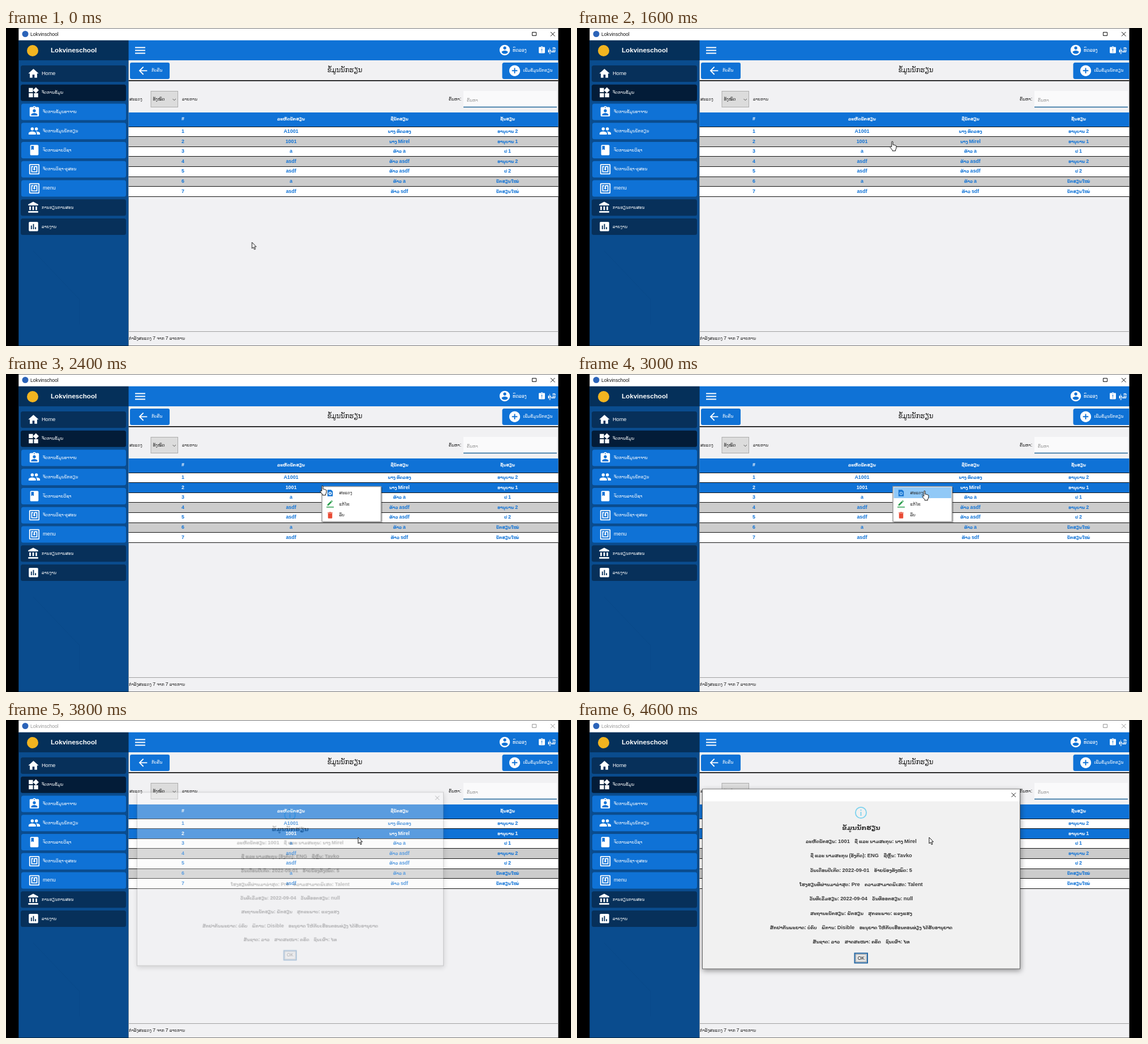
These frames come from a looping animation (998x561 px, 4800 ms). An HTML page:

```html
<!DOCTYPE html>
<html lang="lo">
<head>
<meta charset="utf-8">
<title>School records</title>
<style>
html, body { margin: 0; width: 100%; height: 100%; overflow: hidden; background: #000; }
svg { display: block; width: 998px; height: 561px; }
text { font-family: 'Liberation Sans', 'DejaVu Sans', sans-serif; }

.pick, .pick-text, .chrome, .chrome-line, .menu, .hover, .dialog, .cursor, .arrow, .hand {
  animation-duration: 4.8s;
  animation-timing-function: step-end;
  animation-iteration-count: infinite;
}
.pick { animation-name: pick; }
.pick-text { animation-name: pick-text; }
.chrome { animation-name: chrome; }
.chrome-line { animation-name: chrome-line; }
.menu { animation-name: menu; }
.hover { animation-name: hover; }
.dialog { animation-name: dialog; transform-origin: 502px 280.5px; }
.cursor { animation-name: cursor; }
.arrow { animation-name: arrow; }
.hand { animation-name: hand; }

@keyframes pick { 0% { fill: #cccccc; } 37.49%, 100% { fill: #0f72d6; } }
@keyframes pick-text { 0% { fill: #0f72d6; } 37.49%, 100% { fill: #fff; } }
@keyframes chrome { 0% { fill: #111; } 79.16%, 100% { fill: #999; } }
@keyframes chrome-line { 0% { stroke: #111; } 79.16%, 100% { stroke: #999; } }
@keyframes menu { 0% { opacity: 0; } 49.99% { opacity: 1; } 79.16%, 100% { opacity: 0; } }
@keyframes hover { 0% { opacity: 0; } 54.16%, 100% { opacity: 1; } }
@keyframes dialog {
  0% { opacity: 0; transform: scale(.965); }
  79.16% { opacity: .33; transform: scale(.965); }
  83.32%, 100% { opacity: 1; transform: none; }
}
@keyframes cursor {
  0% { transform: translate(434.5px, 378px); }
  4.16% { transform: translate(505px, 325px); }
  8.33% { transform: translate(537px, 270px); }
  12.49% { transform: translate(540px, 240px); }
  16.66% { transform: translate(540px, 216px); }
  20.83% { transform: translate(541px, 210px); }
  24.99% { transform: translate(547px, 193px); }
  29.16% { transform: translate(552px, 198px); }
  33.33% { transform: translate(557px, 200px); }
  37.49% { transform: translate(560px, 201px); }
  49.99% { transform: translate(559px, 197px); }
  54.16% { transform: translate(600px, 203px); }
  62.49% { transform: translate(614px, 206px); }
  66.66%, 100% { transform: translate(622px, 207px); }
}
@keyframes arrow { 0% { opacity: 1; } 8.33% { opacity: 0; } 79.16%, 100% { opacity: 1; } }
@keyframes hand { 0% { opacity: 0; } 8.33% { opacity: 1; } 79.16%, 100% { opacity: 0; } }
</style>
</head>
<body>
<svg id="stage" viewBox="0 0 998 561" xmlns="http://www.w3.org/2000/svg"></svg>
<script>
const BLUE = '#0f72d6', NAVY = '#07305a';
const LEFT = 22.3, SPLIT = 216.5, RIGHT = 975.5;
const WIDE = RIGHT - SPLIT;

// icons on a 24-unit grid
const disc = 'M12 2C6.48 2 2 6.48 2 12s4.48 10 10 10 10-4.48 10-10S17.52 2 12 2z';
const board = 'M19 3h-4.18C14.4 1.84 13.3 1 12 1c-1.3 0-2.4.84-2.82 2H5c-1.1 0-2 .9-2 2v14c0 1.1.9 2 2 2h14c1.1 0 2-.9 2-2V5c0-1.1-.9-2-2-2zm-7 0c.55 0 1 .45 1 1s-.45 1-1 1-1-.45-1-1 .45-1 1-1z';
const icons = {
  home: 'M10 20v-6h4v6h5v-8h3L12 3 2 12h3v8z',
  widgets: 'M13 13v8h8v-8zM3 21h8v-8H3zM3 3v8h8V3zm13.66-1.31L11 7.34 16.66 13l5.66-5.66z',
  teacher: board + 'm0 4c1.66 0 3 1.34 3 3s-1.34 3-3 3-3-1.34-3-3 1.34-3 3-3zm6 12H6v-1.4c0-2 4-3.1 6-3.1s6 1.1 6 3.1V19z',
  notice: board + 'M13 14h-2V8h2zm0 4h-2v-2h2z',
  people: 'M16 11a3 3 0 1 0 0-6 3 3 0 0 0 0 6zM8 11a3 3 0 1 0 0-6 3 3 0 0 0 0 6zm0 2c-2.33 0-7 1.17-7 3.5V19h14v-2.5c0-2.33-4.67-3.5-7-3.5zm8 0c-.29 0-.62.02-.97.05 1.16.84 1.97 1.97 1.97 3.45V19h6v-2.5c0-2.33-4.67-3.5-7-3.5z',
  book: 'M18 2H6c-1.1 0-2 .9-2 2v16c0 1.1.9 2 2 2h12c1.1 0 2-.9 2-2V4c0-1.1-.9-2-2-2zM6 4h5v8l-2.5-1.5L6 12z',
  tag: 'M20 2H4c-1.1 0-2 .9-2 2v16c0 1.1.9 2 2 2h16c1.1 0 2-.9 2-2V4c0-1.1-.9-2-2-2zm0 18H4V4h16zM18 6h-5c-1.1 0-2 .9-2 2v2.28c-.6.35-1 .98-1 1.72 0 1.1.9 2 2 2s2-.9 2-2c0-.74-.4-1.38-1-1.72V8h3v8H8V8h2V6H6v12h12z',
  bank: 'M4 10v7h3v-7zm6 0v7h3v-7zM2 22h19v-3H2zm14-12v7h3v-7zm-4.5-9L2 6v2h19V6z',
  chart: 'M19 3H5c-1.1 0-2 .9-2 2v14c0 1.1.9 2 2 2h14c1.1 0 2-.9 2-2V5c0-1.1-.9-2-2-2zM9 17H7v-7h2zm4 0h-2V7h2zm4 0h-2v-4h2z',
  user: disc + 'm0 3c1.66 0 3 1.34 3 3s-1.34 3-3 3-3-1.34-3-3 1.34-3 3-3zm0 14.2c-2.5 0-4.71-1.28-6-3.22.03-1.99 4-3.08 6-3.08 1.99 0 5.97 1.09 6 3.08-1.29 1.94-3.5 3.22-6 3.22z',
  add: disc + 'm5 11h-4v4h-2v-4H7v-2h4V7h2v4h4z',
  back: 'M20 11H7.83l5.59-5.59L12 4l-8 8 8 8 1.41-1.41L7.83 13H20z',
  find: 'M4 2h11l5 5v15H4zM12 8a5 5 0 1 0 0 10 5 5 0 0 0 0-10zm0 2.5a2.5 2.5 0 1 1 0 5 2.5 2.5 0 0 1 0-5z',
  edit: 'M3 13.25V17h3.75L17.81 5.94l-3.75-3.75zM20.7 3.04L17 -.7l-1.9 1.9 3.75 3.75zM0 20h24v3H0z',
  bin: 'M6 19c0 1.1.9 2 2 2h8c1.1 0 2-.9 2-2V7H6zM19 4h-3.5l-1-1h-5l-1 1H5v2h14z'
};

const rect = (x, y, w, h, fill, more = '') =>
  `<rect x="${x}" y="${y}" width="${w}" height="${h}" fill="${fill}" ${more}/>`;
const line = (d, color, width = 1, more = '') =>
  `<path d="${d}" fill="none" stroke="${color}" stroke-width="${width}" ${more}/>`;
const rule = (y, color, width) => line(`M${SPLIT} ${y}H${RIGHT}`, color, width);
const circle = (x, y, r, fill, more = '') =>
  `<circle cx="${x}" cy="${y}" r="${r}" fill="${fill}" ${more}/>`;
const icon = (name, x, y, size, fill = '#fff') =>
  `<path transform="translate(${x - size / 2} ${y - size / 2}) scale(${size / 24})" d="${icons[name]}" fill="${fill}" fill-rule="evenodd"/>`;
// Latin runs are set larger than the Lao around them; double spaces mark wide gaps
const text = (x, y, str, size, fill, more = '') =>
  `<text x="${x}" y="${y}" font-size="${size}" fill="${fill}" ${more}>` +
  str.replace(/[!-~]+/g, '<tspan font-size="1.25em">$&</tspan>').replace(/ {2}/g, '\u00a0\u00a0\u00a0 ') + '</text>';
const BOLD = 'font-weight="700"';
const MID = 'text-anchor="middle"';

function titleBar() {
  return rect(LEFT, 0, RIGHT - LEFT, 1, '#777') + rect(LEFT, 1, RIGHT - LEFT, 21, '#fff') +
    circle(34, 10.5, 5.5, '#2b63b8') +
    text(43, 14, 'Lokvinschool', 6.9, '#111', 'class="chrome"') +
    line('M929.5 7.5h7v6h-7zM962 7l7.5 7.5M969.5 7l-7.5 7.5', '#111', 1, 'class="chrome-line"');
}

function sidebar() {
  const items = [
    ['home', 'Home'], ['widgets', 'ຈັດການຂໍ້ມູນ'],
    ['teacher', 'ຈັດການຂໍ້ມູນອາຈານ'], ['people', 'ຈັດການຂໍ້ມູນນັກຮຽນ'],
    ['book', 'ຈັດການລາຍວິຊາ'], ['tag', 'ຈັດການວິຊາ-ຄູສອນ'], ['tag', 'menu'],
    ['bank', 'ການຮຽນການສອນ'], ['chart', 'ລາຍງານ']
  ];
  const width = SPLIT - LEFT;
  let out = rect(LEFT, 22, width, 538.5, '#0a4c8e') + rect(LEFT, 21.7, width, 35.3, '#05305a') +
    line('M48 393l82 86v44', '#094989') +
    circle(47, 40, 10, '#f2b420') +
    text(79, 42.5, 'Lokvineschool', 9.3, '#fff', BOLD);
  items.forEach(([name, label], i) => {
    const sub = i > 1 && i < 7, y = 66 + i * 33.75;
    const fill = sub ? BLUE : i == 1 ? '#031c38' : NAVY;
    out += rect(sub ? 27 : 26, y, sub ? 185 : 186, 29, fill, 'rx="3.5"') +
      icon(name, sub ? 50 : 48.5, y + 14.3, 22) +
      text(sub ? 65 : 63, y + 16.5, label, 7.3, '#fff');
  });
  return out;
}

function topBar() {
  return rect(SPLIT, 21.7, WIDE, 35.3, BLUE) +
    line('M228 34.5h18M228 39.5h18M228 44.5h18', '#fff', 2) +
    icon('user', 881, 39, 22) + text(895, 41.5, 'ທົດລອງ', 8, '#fff') +
    icon('notice', 946.5, 39, 14.5) + text(957, 43, 'ຄູ່ມື', 8.8, '#fff', BOLD);
}

function toolbar() {
  return rect(SPLIT, 57, WIDE, 503.5, '#f1f1f3') +
    rect(219, 61, 70, 29, BLUE, 'rx="3"') + icon('back', 242, 75.3, 22) +
    text(257, 77, 'ກັບຄືນ', 7.3, '#fff') +
    text(598.5, 78, 'ຂໍ້ມູນນັກຮຽນ', 11.5, '#111', MID) +
    `<path d="M${RIGHT} 61H880a3.5 3.5 0 0 0-3.5 3.5v22a3.5 3.5 0 0 0 3.5 3.5H${RIGHT}z" fill="${BLUE}"/>` +
    icon('add', 898.5, 75.3, 23) + text(913.5, 77, 'ເພີ່ມຂໍ້ມູນນັກຮຽນ', 7.3, '#fff') +
    rule(92.8, '#111', 1.8) +
    text(218, 128, 'ສະແດງ', 7.2, '#222') +
    rect(256, 111.5, 47.5, 28, '#dcdcdc', 'stroke="#ababab"') +
    text(259.5, 128, 'ທັງໝົດ', 7.4, '#222') + line('M294.5 125l2.7 2.7 2.7-2.7', '#555') +
    text(311, 128, 'ລາຍການ', 7.2, '#222') +
    text(782, 128, 'ຄົ້ນຫາ:', 7.3, '#222') +
    rect(808, 111, 165, 28, '#fafafb') + line('M808 139.5h165', '#1f6499', 1.6) +
    text(814, 130, 'ຄົ້ນຫາ', 7.3, '#999');
}

function table() {
  const cols = [312.5, 503.5, 695, 886];
  const pitch = 17.55, top = 174.25;
  const cells = (row, y, fill, more = '') =>
    row.map((s, i) => text(cols[i], y, s, 7.1, fill, `${MID} ${BOLD} ${more}`)).join('');
  const rows = [
    ['A1001', 'ນາງ ທົດລອງ', 'ອານຸບານ 2'], ['1001', 'ນາງ Mirel', 'ອານຸບານ 1'],
    ['a', 'ທ້າວ a', 'ປ 1'], ['asdf', 'ທ້າວ asdf', 'ອານຸບານ 2'],
    ['asdf', 'ທ້າວ asdf', 'ປ 2'], ['a', 'ທ້າວ a', 'ນັກຮຽນໃໝ່'], ['asdf', 'ທ້າວ sdf', 'ນັກຮຽນໃໝ່']
  ];
  let out = rect(SPLIT, 149, WIDE, 25.5, BLUE) +
    cells(['#', 'ລະຫັດນັກຮຽນ', 'ຊື່ນັກຮຽນ', 'ຊັ້ນຮຽນ'], 163, '#fff');
  rows.forEach((row, i) => {
    const y = top + i * pitch, picked = i == 1;
    out += rect(SPLIT, y, WIDE, pitch, i % 2 ? '#cccccc' : '#fff', picked ? 'class="pick"' : '') +
      cells([String(i + 1), ...row], y + 11, BLUE, picked ? 'class="pick-text"' : '');
  });
  for (let i = 0; i <= rows.length; i++) out += rule(Math.floor(top + i * pitch) + .5, '#111');
  return out + rule(535.5, '#a0a0a0') +
    text(217, 550, 'ກຳລັງສະແດງ 7 ຈາກ 7 ລາຍການ', 7.3, '#222');
}

function menu() {
  const items = [
    ['find', 'ສະແດງ', '#1976d2', 14], ['edit', 'ແກ້ໄຂ', '#2e9e4f', 13], ['bin', 'ລຶບ', '#e94b35', 15]
  ];
  return '<g class="menu">' + rect(560, 200, 105, 63, '#000', 'opacity=".25"') +
    rect(558, 198.5, 104.5, 62, '#fff', 'stroke="#999" stroke-width="1.5"') +
    rect(559.5, 200, 101.5, 19, '#91c9f7', 'class="hover"') +
    items.map(([name, label, color, size], i) =>
      icon(name, 572.5, 210 + i * 19.6, size, color) +
      text(588.5, 212 + i * 19.6, label, 7.3, '#222')).join('') + '</g>';
}

function dialog() {
  const lines = [
    'ລະຫັດນັກຮຽນ: 1001  ຊື່ ແລະ ນາມສະກຸນ: ນາງ Mirel',
    'ຊື່ ແລະ ນາມສະກຸນ (ອັງກິດ): ENG  ຊື່ຫຼິ້ນ: Tavko',
    'ວັນເດືອນປີເກີດ: 2022-09-01  ອ້າຍນ້ອງທັງໝົດ: 5',
    'ໂຮງຮຽນທີ່ຜ່ານມາລ່າສຸດ: Pre  ຄວາມສາມາດພິເສດ: Talent',
    'ວັນທີ່ເລີ່ມຮຽນ: 2022-09-04  ວັນທີ່ອອກຮຽນ: null',
    'ສະຖານະນັກຮຽນ: ພັກຮຽນ  ສຸກຂະພາບ: ແຂງແຮງ',
    'ສັກຢາກັນພະຍາດ: ບໍ່ຄົບ  ພິການ: Disible  ອະນຸຍາດ ໃຫ້ກັບເຮືອນຕອນທ່ຽງ ໄດ້ຮັບອານຸຍາດ',
    'ສັນຊາດ: ລາວ  ສາດສະໜາ: ຄຣິດ  ຊົນເຜົ່າ: ໄທ'
  ];
  return '<g class="dialog">' +
    rect(221.5, 122, 561, 317, '#f1f1f1', 'stroke="#666" style="filter:drop-shadow(1px 3px 5px rgba(0,0,0,.4))"') +
    rect(222, 122.5, 560, 21, '#fff') +
    line('M767.5 128.5l7.5 7.5M775 128.5l-7.5 7.5', '#222') +
    circle(501.5, 163.5, 9.6, 'none', 'stroke="#7cd2ee" stroke-width="1.8"') +
    line('M501.5 158v2M501.5 162v7', '#7cd2ee', 1.8) +
    text(502, 193.5, 'ຂໍ້ມູນນັກຮຽນ', 11.2, '#333', `${MID} ${BOLD}`) +
    lines.map((s, i) => text(502, 217 + i * 25.3, s, 7.5, '#3a3a3a', `${MID} ${BOLD}`)).join('') +
    rect(490.5, 411.5, 22.5, 17, '#e4e4e4', 'stroke="#2467a3" stroke-width="2"') +
    rect(492.5, 413.5, 18.5, 13, 'none', 'stroke="#444" stroke-width=".7" stroke-dasharray="1 1"') +
    text(501.8, 422.5, 'OK', 6.8, '#222', MID) + '</g>';
}

function cursor() {
  const shape = (name, d) =>
    `<path class="${name}" d="${d}" fill="#fff" stroke="#111" stroke-width="1" stroke-linejoin="round"/>`;
  return '<g class="cursor">' +
    shape('arrow', 'M0 0v11l2.5-2.3 1.8 4.1 1.8-.8-1.8-4h3.2z') +
    shape('hand', 'M-1.2 9.5V1.2a1.1 1.1 0 0 1 2.2 0V6l1.8.2 1.8.6 1.6.6q1 .4 .9 1.6l-.4 4-1.2 2v1.8h-5.4v-1.4L-3.8 10.6q-.6-1.6.8-1.6z') +
    '</g>';
}

document.getElementById('stage').innerHTML =
  [titleBar, sidebar, topBar, toolbar, table, menu, dialog, cursor].map(part => part()).join('');
</script>
</body>
</html>
```
